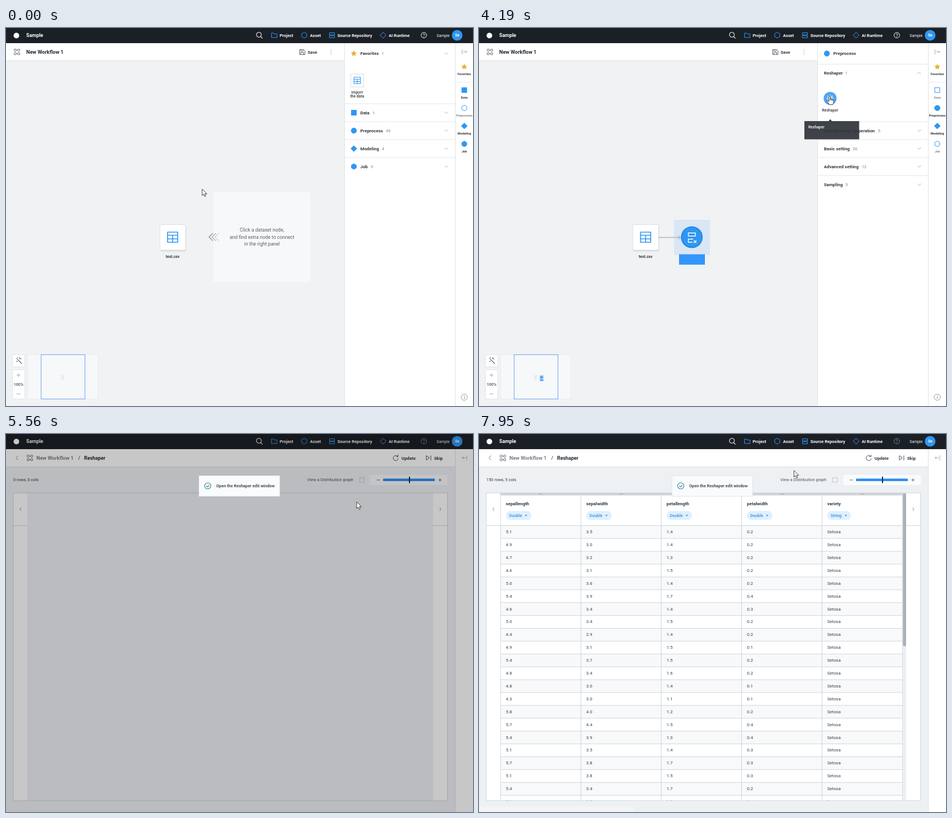
Animation of 831x674 px, one loop 8 s. Source, as an HTML page:

```html
<!DOCTYPE html>
<html lang="en">
<head>
<meta charset="utf-8">
<title>Workflow editor</title>
<style>
html,body{margin:0;width:100%;height:100%;overflow:hidden;background:#f0f2f4}
svg{display:block;width:831px;height:674px;font-family:Roboto,sans-serif}
</style>
</head>
<body>
<svg id="stage" viewBox="0 0 831 674" xmlns="http://www.w3.org/2000/svg"></svg>
<script>
const BLUE = '#2f96f3', INK = '#33383f', DIM = '#8b9198', LINE = '#dfe2e6', BG = '#f0f2f4';
const TOOL = 'Reshaper', USER = 'Sample';

// drawing helpers
const text = (x, y, s, size, fill = INK, weight = 400, anchor = 'start') =>
  `<text x="${x}" y="${y}" font-size="${size}" fill="${fill}" font-weight="${weight}" text-anchor="${anchor}">${s}</text>`;
const rect = (x, y, w, h, fill = 'none', stroke = 'none', extra = '') =>
  `<rect x="${x}" y="${y}" width="${w}" height="${h}" fill="${fill}" stroke="${stroke}" ${extra}/>`;
const disc = (x, y, r, fill = 'none', stroke = 'none', extra = '') =>
  `<circle cx="${x}" cy="${y}" r="${r}" fill="${fill}" stroke="${stroke}" ${extra}/>`;
const path = (d, stroke = INK, width = 1, fill = 'none', extra = '') =>
  `<path d="${d}" stroke="${stroke}" stroke-width="${width}" fill="${fill}" ${extra}/>`;
const group = (id, body) => `<g id="${id}">${body}</g>`;
const at = (x, y, body) => `<g transform="translate(${x} ${y})">${body}</g>`;
const chevron = (x, y, up) => path(`M${x - 3} ${y + (up ? 1.5 : -1.5)}l3 ${up ? -3 : 3}l3 ${up ? 3 : -3}`, '#9aa0a8', .8);
const cross = (x, y) => path(`M${x - 3.5} ${y - 3.5}l7 7m0-7l-7 7`, '#8a9097', .8);

function polygon(x, y, r, sides, turn = -90, inner = 1) {
  const n = inner < 1 ? sides * 2 : sides;
  let d = '';
  for (let i = 0; i < n; i++) {
    const a = (turn + i * 360 / n) * Math.PI / 180, q = i % 2 ? r * inner : r;
    d += (i ? 'L' : 'M') + (x + q * Math.cos(a)).toFixed(2) + ' ' + (y + q * Math.sin(a)).toFixed(2);
  }
  return d + 'Z';
}
const star = (x, y) => path(polygon(x, y, 5.6, 5, -90, .48), 'none', 0, '#e8b03c');
function shape(kind, x, y, r, filled = true) {
  const f = filled ? BLUE : 'none';
  if (kind === 0) return rect(x - r * .88, y - r * .88, r * 1.76, r * 1.76, f, BLUE);
  if (kind === 1) return disc(x, y, r * .95, f, BLUE);
  return path(polygon(x, y, kind === 2 ? r * 1.05 : r, kind === 2 ? 4 : 6), BLUE, 1, f);
}
const tableIcon = (x, y, s) => at(x, y, `<g transform="scale(${s})">` +
  path('M-9-9H9V9H-9ZM-9-3.5H9M-9 3H9M0-3.5V9', BLUE, 1.7, 'none', 'stroke-linejoin="round"') + '</g>');
function meshIcon(x, y, s) {
  let out = '<g transform="scale(' + s + ')">' + rect(-3.6, -3.6, 7.2, 7.2, 'none', '#fff', 'stroke-width="1.2"');
  for (let a = 0; a < 360; a += 90)
    out += `<g transform="rotate(${a})">` + path('M0-3.6V-8M-2.2-3.6V-6H-5M2.2-3.6V-6H5', '#fff', 1) +
      disc(0, -8.6, 1, '#fff') + disc(-5.6, -6, .9, '#fff') + '</g>';
  return at(x, y, out + '</g>');
}
const flowIcon = (x, y) => [[-3.2, -3.2], [3.2, -3.2], [-3.2, 3.2], [3.2, 3.2]].map(([a, b], i) =>
  i === 1 ? disc(x + a, y + b, 1.9, 'none', '#5d636b') : rect(x + a - 1.8, y + b - 1.8, 3.6, 3.6, 'none', '#5d636b', 'rx=".8"')).join('') +
  path(`M${x - 1.3} ${y - 3.2}h2.6M${x - 1.3} ${y + 3.2}h2.6`, '#5d636b', .8);

function topBar() {
  const nav = (x, s) => text(x, 15.5, s, 7.5, '#fff', 600);
  return rect(0, 0, 831, 27, '#1b2027') + disc(18.5, 13.5, 5, '#fff') +
    text(36, 16.2, USER, 8.9, '#fff', 700) +
    disc(450, 12, 4.3, 'none', '#fff', 'stroke-width="1.1"') + path('M453 15.2l3.4 3.4', '#fff', 1.1) +
    path('M472.5 17V9h3.5l1.2 1.6h5V17Z', BLUE) + nav(487, 'Project') +
    path(polygon(530.7, 12.8, 5.2, 6), BLUE) + nav(541, 'Asset') +
    path('M575.5 8.5h9v3.7h-9ZM575.5 13.7h9v3.7h-9Z', BLUE) + nav(589.7, 'Source Repository') +
    path(polygon(671, 12.8, 5.2, 4), '#5a8df5') + nav(681, 'AI Runtime') +
    `<g id="help" stroke="#fff">` + disc(743.5, 12.8, 4.9, 'none', 'inherit') +
    `<path d="M742 11.7c0-2 3.1-2 3.1 0c0 1.2-1.6 1.2-1.6 2.5M743.5 15v.9" fill="none" stroke-width=".9"/></g>` +
    text(766.3, 15.6, USER, 6.9, '#fff') + disc(802.8, 13, 9.5, BLUE) + text(802.8, 15.3, USER.slice(0, 2), 6.7, '#fff', 700, 'middle');
}

function minimap() {
  return rect(11.5, 582.5, 22, 22, '#fff', '#e2e5e9') +
    path('M20 590.5l8 8M18.3 588.6l1 1M24.5 587v3M27.5 590h-3M18 594.5h2.6M20.6 587v1.8', '#5b6169', 1.1) +
    rect(11.5, 609.5, 22, 52, '#fff', '#e2e5e9') +
    path('M19 619h6.500M22.250 615.800v6.500M19 652.500h6.500', '#8d939b', .8) +
    text(22.4, 637.8, '100%', 7, '#444a52', 500, 'middle') +
    rect(38.5, 582.5, 125, 79, '#f6f8fa', '#e9ecef') + rect(62.5, 582.5, 78, 79, '#f6f8fa', '#80b0f5', 'stroke-width="1.2"') +
    group('mapPlain', rect(98.500, 619, 4.500, 8, '#f1f2f4', '#dfe2e5', 'stroke-width=".6"') + rect(100, 622, 1.6, 1.6, '#c6cad0')) +
    group('mapPicked', rect(97, 618.5, 8, 8, '#d5e6fa') + rect(98, 620, 6, 5, '#8fc0f5') + rect(98, 626.5, 6, 3, '#5ea9f7')) +
    group('mapTool', rect(107, 618.5, 9, 8, '#d5e6fa') + disc(111.4, 622.8, 2.8, '#5ea3e8') + rect(108.5, 626.5, 6, 3, '#4f9ff5'));
}

function editor() {
  const halves = ['#8a8f96', '#a9aeb5', '#cbcfd4'].map((c, i) =>
    path(`M${368 + i * 5.3} 366l-6.8 6.700l6.800 6.700`, c, 1.3)).join('');
  return rect(0, 27, 602, 647, BG) + rect(0, 27, 602, 31, '#fff') + path('M0 58.5H602', LINE) +
    flowIcon(19.500, 42.600) + text(36, 46, 'New Workflow 1', 9.1, '#23282e', 700) +
    path('M522.500 38.300h7l2.500 2.300v6.700h-9.500ZM524.700 38.500v2.800h4v-2.800M524.700 47v-3.300h5V47', '#4c525a', .9) +
    text(536.8, 45.6, 'Save', 7.8, INK, 600) + [39, 42.500, 46].map(y => disc(578.500, y, .8, '#9aa0a7')).join('') +
    group('guide', rect(369.5, 292.5, 172, 160.5, '#f7f8fa') + halves +
      ['Click a dataset node,', 'and find extra node to connect', 'in the right panel'].map((s, i) =>
        text(455.5, 362.6 + i * 12.9, s, 8.55, '#5a6068', 400, 'middle')).join('')) +
    group('picked', rect(265, 342, 64, 63, '#dae6f3') + rect(274, 403, 46, 19, '#3396fd')) +
    rect(274.500, 352.500, 46, 46, '#000', 'none', 'rx="2" opacity=".09"') +
    rect(273.800, 350.500, 45.700, 45.500, '#fff', '#dcdfe3', 'rx="1.5"') + tableIcon(296.5, 373, 1) +
    group('pickedEdge', rect(274.500, 351, 44.500, 44.500, 'none', '#2389f3', 'stroke-width="2"')) +
    group('ports', rect(273.500, 370, 3, 6, '#fff', '#74b3f2', 'stroke-width=".9"') + rect(316.800, 370, 3, 6, '#fff', '#74b3f2', 'stroke-width=".9"')) +
    `<g id="csv" fill="${INK}"><text x="296.500" y="409.500" font-size="6.9" font-weight="700" text-anchor="middle">test.csv</text></g>` +
    group('tool', rect(347, 342, 64, 63, '#dae6f3') + rect(356, 403.500, 46, 18.500, '#3396fd') +
      `<g id="link" stroke="#b1b6bd"><path d="M319.500 373.500H358M354.500 370.500l4.200 3l-4.200 3" fill="none" stroke-width="1.3"/></g>` +
      disc(378.700, 373, 18.500, BLUE, '#1583ee', 'stroke-width="1.6"') +
      group('blank', path('M372.500 365.500h12.500v5.500h-12.500ZM381 376.500h-8.500v5.500h7.500M382.300 378.700l4.500 4.500m0-4.500l-4.500 4.500', '#fff', 1.4)) +
      group('named', meshIcon(378.700, 373, 1) + text(378.8, 409.5, TOOL, 6.9, '#fff', 600, 'middle'))) +
    minimap();
}

const counted = (x, y, s, n, nx) => text(x, y + 2.7, s, 7.9, INK, 600) + text(nx, y + 2.6, n, 7.3, '#7d848c');
const rule = y => path(`M603 ${y}H799`, '#e3e6e9');

function panels() {
  const kinds = [['Data', 1, 652], ['Preprocess', 49, 676], ['Modeling', 4, 669], ['Job', 9, 649]];
  const groups = [['Data Binding / Seperation', 5, 710], ['Basic setting', 26, 665], ['Advanced setting', 12, 681], ['Sampling', 5, 652]];
  const facts = [['Data source', 's3a://accu-autotest/test.csv'], ['Column', '5'], ['Row', '150'], ['Additional option', '']];
  return rect(602, 27, 229, 647, '#fff') + path('M602.500 27V674', LINE) +
    group('panel0', star(619, 45.5) + counted(630.5, 45.2, 'Favorites', 1, 668.5) + chevron(783.500, 45.500, true) +
      rect(613.500, 82, 23, 23, '#fff', '#d8dce0') + tableIcon(625, 93.500, .64) +
      text(624.8, 117, 'Import', 6.8, INK, 500, 'middle') + text(624.8, 124.3, 'the data', 6.8, INK, 500, 'middle') +
      kinds.map(([s, n, x], i) => {
        const y = 151 + i * 32;
        return rule(y - 16) + shape(i, 619, y, 5) + counted(630.5, y, s, n, x) + chevron(783.5, y);
      }).join('')) +
    group('panel1', cross(619, 42.5) + rect(637, 37.5, 10.5, 10.5, BLUE) + text(656, 46, 'test.csv', 8.9, '#23282e', 700) +
      facts.map(([a, b], i) => text(617, 80.7 + i * 42, a, 7.35, INK, 600) + text(617, 98 + i * 42, b, 6.8, DIM)).join('') +
      rect(617, 217.5, 49.500, 17.500, '#fff', '#4ba3f4') +
      path('M629 223.500h-2.500v5.500h5.500v-2.500M629.500 226l2.700-2.700M630 223h2.500v2.500', BLUE, .8) + text(637.2, 228.8, 'Setting', 7.1, '#1f86ee', 600)) +
    group('panel2', shape(1, 619, 45.5, 5) + text(630.5, 48, 'Preprocess', 7.9, INK, 600) + rule(64.5) +
      counted(613.700, 80, TOOL, 1, 651.5) + chevron(783.500, 80.500, true) +
      `<g id="pick">` + disc(624.800, 125.500, 11.500, BLUE) + meshIcon(624.800, 125.500, .72) + '</g>' +
      text(624.8, 148.7, TOOL, 6.9, INK, 500, 'middle') +
      groups.map(([s, n, x], i) => {
        const y = 183 + i * 32;
        return rule(y - 16) + counted(613.700, y, s, n, x) + chevron(783.5, y);
      }).join('')) +
    group('panel3', cross(619, 45.2) + disc(642, 45.2, 5.7, BLUE) + text(656, 48.4, TOOL, 8.9, '#23282e', 700) +
      rect(716, 36, 74, 18, '#0d82fb') + text(753, 48, 'Edit the ' + TOOL, 7.7, '#fff', 700, 'middle') +
      text(617, 89.7, 'Total preprocessing', 6.8, DIM) +
      rect(617, 107, 168.500, 86.500, 'none', '#b4b9bf', 'rx="2" stroke-dasharray="2 1.500" stroke-width=".9"') +
      text(701.3, 153.6, 'No execution history to display', 7.95, '#878d95', 400, 'middle')) +
    path('M799.500 27V674', LINE) + path('M811.500 38v9M813.500 42.500h6.500M817.500 40l2.500 2.500l-2.500 2.500', '#a0a6ad', .9) +
    star(815.5, 69.3) + text(815.5, 84.2, 'Favorites', 5.75, INK, 600, 'middle') + path('M800 96.500H831', '#e8ebee') +
    ['1011', '0110', '0000'].map((on, k) => group('side' + k, kinds.map(([s], i) =>
      shape(i, 815.5, 110.7 + i * 32, 5, on[i] > 0) +
      text(815.5, 126.2 + i * 32, s, 5.75, on[i] > 0 ? INK : '#737981', on[i] > 0 ? 600 : 500, 'middle')).join(''))).join('') +
    disc(815.5, 658.3, 5.5, 'none', '#868c93', 'stroke-width=".9"') + path('M815.500 657.300v4M815.500 655v1', '#868c93', 1) +
    group('tip', path('M622 166.500l3-4l3 4Z', 'none', 0, '#2f343a') + rect(579, 166, 97.500, 32.500, '#2f343a', 'none', 'opacity=".92"') +
      text(586, 179, TOOL, 6.8, '#fff', 500));
}

const DATA = `5.1 3.5 1.4 0.2,4.9 3.0 1.4 0.2,4.7 3.2 1.3 0.2,4.6 3.1 1.5 0.2,5.0 3.6 1.4 0.2,5.4 3.9 1.7 0.4,
4.6 3.4 1.4 0.3,5.0 3.4 1.5 0.2,4.4 2.9 1.4 0.2,4.9 3.1 1.5 0.1,5.4 3.7 1.5 0.2,4.8 3.4 1.6 0.2,4.8 3.0 1.4 0.1,
4.3 3.0 1.1 0.1,5.8 4.0 1.2 0.2,5.7 4.4 1.5 0.4,5.4 3.9 1.3 0.4,5.1 3.5 1.4 0.3,5.7 3.8 1.7 0.3,5.1 3.8 1.5 0.3,
5.4 3.4 1.7 0.2,5.1 3.7 1.5 0.4`.split(',').map(r => r.trim() + ' Setosa');

function grid() {
  const heads = ['sepallength', 'sepalwidth', 'petallength', 'petalwidth', 'variety'], W = 143, H = 22.9;
  let out = rect(38, 105, 722, 549, '#fff');
  DATA.forEach((row, r) => {
    const y = 163 + r * H;
    if (r % 2 === 0) out += rect(38, y, 716, H, '#f7f9fa');
    out += path(`M38 ${y + .3}H754`, '#ccd3da', .9);
    row.split(' ').forEach((v, c) => out += text(47.7 + c * W, y + 14.1, v, 7.8, '#3a4047'));
  });
  out += rect(38, 105, 716, 4.5, '#d0d4d9');
  heads.forEach((h, c) => {
    const x = 38.3 + c * W, type = c === 4 ? 'String' : 'Double';
    out += path(`M${x} 105V654`, '#ccd3da') + [-2.500, 0, 2.500].map(d => disc(x + 71.5 + d, 107.2, .7, '#868c94')).join('') +
      text(x + 9.5, 126.6, h, 7.9, INK, 700) + rect(x + 9.5, 137.3, c === 4 ? 42 : 45.500, 16, '#dff0fe', 'none', 'rx="8"') +
      text(x + 15.5, 148, type, 7.3, '#2b8fe8', 500) +
      path(`M${x + (c === 4 ? 40.5 : 43.5)} 144.300h4l-2 2.600Z`, 'none', 0, '#2b8fe8');
  });
  return out + path('M753.800 105V654', '#ccd3da') + rect(754.300, 105, 5.700, 549, '#eceff2') + rect(754.300, 105.500, 5.700, 273, '#abb1b9', 'none', 'rx="2.800"');
}

function sheet() {
  return rect(0, 27, 831, 647, '#eef1f4') + rect(0, 27, 799, 31, '#fff') + path('M0 58.500H799', '#dde1e5') +
    path('M21.500 38.500l-4 4l4 4', '#6e747c', .9) + flowIcon(42.500, 42.600) +
    text(54, 46, 'New Workflow 1', 9.1, '#7b8189', 600) + text(128.6, 46, '/', 9.1, '#4a5058', 500) + text(139, 46, TOOL, 8.9, '#23282e', 700) +
    path('M697 40a4.500 4.500 0 1 0 1 3.500M697.500 37v3.300h-3.300', '#4c525a', 1) + text(703.7, 45.7, 'Update', 7.9, INK, 600) +
    path('M748 38.500v8l5.500-4ZM756 38.300v8.500', '#4c525a', 1) + text(761.7, 45.7, 'Skip', 7.9, INK, 600) +
    `<text id="rows" x="13" y="84.300" font-size="7.4" fill="${INK}"></text>` +
    text(536, 84.3, 'View a Distribution graph', 7.4, '#4c525a') + rect(629.500, 78, 8, 8, 'none', '#bcc2c9', 'stroke-width=".9"') +
    rect(648, 73, 138, 18, '#fafbfc') + path('M659.500 82h5.500M769.500 82h5.500M772.250 79.200v5.500', '#4c525a', .9) +
    rect(671, 79.500, 92, 4.500, '#2b8ff5') + rect(717, 76, 2, 11.500, '#22272d') +
    rect(13, 105, 25, 549, '#fff') + rect(760, 105, 25.500, 549, '#fff') +
    group('grid', `<g clip-path="url(#clip)">${grid()}</g>`) +
    path('M13 163.300H38M760 163.300H785.500M13 105H785.500V653.800H13Z', '#cfd5db') +
    path('M27 131l-2.500 3l2.500 3M771.500 131l2.500 3l-2.500 3', '#7d838b', .9) +
    rect(800, 27, 31, 647, '#fff') + path('M799.500 27V674', '#dde1e5') +
    path('M820 38v9M818 42.500h-6.500M814 40l-2.500 2.500l2.500 2.500', '#a0a6ad', .9);
}

function spinner() {
  let ring = '';
  const n = 60, p = a => (46.5 * Math.cos(a)).toFixed(2) + ' ' + (46.5 * Math.sin(a)).toFixed(2);
  for (let i = 0; i < n; i++) {
    const a = -i / n * 2 * Math.PI, b = a - 2.15 * Math.PI / n, u = i / n;
    const k = Math.min(1, Math.max(0, (u - .06) / .24)), mix = (c, d) => Math.round(c + (d - c) * k);
    ring += `<path d="M${p(a)}A46.500 46.500 0 0 0 ${p(b)}" fill="none" stroke-width="4" stroke="rgb(${mix(22, 30)},${mix(32, 132)},${mix(48, 245)})" opacity="${Math.min(1, Math.max(0, (.9 - u) / .4)).toFixed(2)}"/>`;
  }
  return at(415, 318.500, `<g id="ring">${ring}</g>` + disc(0, 0, 40.500, '#067cff') + disc(0, 0, 15, '#fff')) +
    rect(385, 381.500, 60.500, 22.500, '#fff', '#69aef6') + text(415.3, 395.6, 'Cancel Run', 8, '#0c7cf5', 600, 'middle');
}

const stage = document.getElementById('stage');
stage.innerHTML = '<defs><clipPath id="clip"><rect x="38" y="105" width="722" height="549"/></clipPath></defs>' +
  group('flow', editor() + panels()) + group('sheet', sheet()) + topBar() +
  rect(0, 0, 831, 674, '#000', 'none', 'id="shade"') + group('spin', spinner()) +
  group('toast', rect(343.500, 75.500, 144, 36, '#000', 'none', 'opacity=".05"') + rect(343.500, 74.500, 143.500, 36.500, '#fafbfc', '#e4e7ea') +
    disc(359, 92.500, 5.500, 'none', '#2e7f94', 'stroke-width="1.100"') + path('M356.500 92.500l1.900 2l3.300-3.700', '#2e7f94', 1.1) +
    text(374, 95.200, `Open the ${TOOL} edit window`, 7.35, '#474d55', 600)) +
  rect(0, 663.500, 276, 10.500, '#f2f4f6', 'none', 'id="trace"') +
  group('status', rect(0, 663.500, 275, 10.500, '#000') +
    `<text x="1.500" y="671.400" font-size="7" fill="#fff" style="font-family:'Noto Sans CJK KR','Noto Sans CJK',sans-serif">aiip.skcc.com의 응답을 기다리는 중...</text>`) +
  group('arrow', path('M0 0V11.800L2.700 9.300L4.500 13.500L6.500 12.600L4.700 8.600H8.500Z', '#2b2b2b', .9, '#fff')) +
  group('hand', path('M-1.300 1.200c0-1.700 2.500-1.700 2.500 0v4.500l4.400 .9q2 .5 1.800 2.500l-.6 3.300l-1.200 3.300h-5.800l-4.400-5.600c-.8-1.300 .6-2.200 1.700-1.300l1.600 1.500zM1.200 5.700v2.600M3.300 6.200v2.300M5.400 6.700v2', '#2b2b2b', .9, '#fff'));

const el = {};
stage.querySelectorAll('[id]').forEach(n => el[n.id] = n);
const show = (id, on) => el[id].setAttribute('visibility', on ? 'inherit' : 'hidden');
const fade = (id, a) => el[id].setAttribute('opacity', a);

// discrete progress: n visible moves between a and b, the first at a
const steps = (t, a, b, n) => t < a ? 0 : Math.min(1, (Math.floor((t - a) * (n - 1) / (b - a) + .001) + 1) / n);
const ease = u => u * u * (3 - 2 * u);

const MOVES = [
  { a: 520, b: 1070, n: 8, pts: [[349, 287], [304, 371]] },
  { a: 2010, b: 2710, n: 11, pts: [[304, 371], [812, 144]] },
  { a: 3770, b: 4190, n: 7, pts: [[812, 144], [624, 121]] },
  { a: 6050, b: 6390, n: 6, pts: [[622, 121], [534, 141]] },
  { a: 7190, b: 7950, n: 11, pts: [[534, 141], [471, 114], [628, 98], [560.5, 65]] }
];
function pointer(t) {
  let pos = MOVES[0].pts[0];
  for (const m of MOVES) {
    if (t < m.a) break;
    const last = m.pts.length - 1, s = steps(t, m.a, m.b, m.n) * last;
    const i = Math.min(last - 1, Math.floor(s)), k = ease(s - i), [p, q] = [m.pts[i], m.pts[i + 1]];
    pos = [p[0] + (q[0] - p[0]) * k, p[1] + (q[1] - p[1]) * k];
  }
  return pos;
}

function draw(t) {
  const second = t >= 5560, loaded = t >= 5980, [x, y] = pointer(t);
  const overNode = x > 273 && x < 321 && y > 349 && y < 397 && t < 2980;
  const overTool = !second && t > 3180 && Math.hypot(x - 624.8, y - 125.5) < 12;
  const hand = !second && (overNode || overTool || x > 803);
  const picked = t >= 1400 && t < 3080, tool = t >= 3080, named = t >= 5070;
  const panel = t < 1750 ? 0 : t < 3180 ? 1 : t < 5070 ? 2 : 3;

  show('flow', !second);
  show('sheet', second);
  if (second) {
    show('grid', loaded);
    el.rows.textContent = loaded ? '150 rows, 5 cols' : '0 rows, 0 cols';
  } else {
    for (let i = 0; i < 4; i++) show('panel' + i, i === panel);
    for (let i = 0; i < 3; i++) show('side' + i, i === [0, 1, 1, 2][panel]);
    fade('guide', t < 2980 ? 1 : t < 3080 ? .5 : 0);
    show('picked', picked);
    show('pickedEdge', picked);
    el.csv.setAttribute('fill', picked ? '#fff' : INK);
    show('ports', overNode);
    show('mapPlain', t < 1490 || tool);
    show('mapPicked', t >= 1490 && !tool);
    show('mapTool', tool);
    show('tool', tool);
    show('blank', tool && !named);
    show('named', named);
    el.link.setAttribute('stroke', named ? '#2f96f3' : '#b1b6bd');
    show('tip', panel === 2 && overTool);
    fade('pick', overTool ? .86 : 1);
  }
  el.help.setAttribute('stroke', second ? '#7d848c' : '#fff');

  const shade = t < 5910 ? steps(t, 5140, 5280, 3) : 1 - steps(t, 5910, 6120, 4);
  fade('shade', .22 * shade);
  show('spin', t >= 5210 && !second);
  el.ring.setAttribute('transform', `rotate(${-74 + (Math.floor((t - 5280) / 70) * 70) * .36})`);
  show('toast', t >= 5210);
  show('status', t >= 5630 && t < 6050);
  show('trace', t >= 6050);

  show('arrow', !hand);
  show('hand', hand);
  el[hand ? 'hand' : 'arrow'].setAttribute('transform', `translate(${x.toFixed(1)} ${y.toFixed(1)})`);
}

const start = performance.now();
function tick() {
  draw((performance.now() - start) % 8000);
  requestAnimationFrame(tick);
}
draw(0);
requestAnimationFrame(tick);
</script>
</body>
</html>
```
